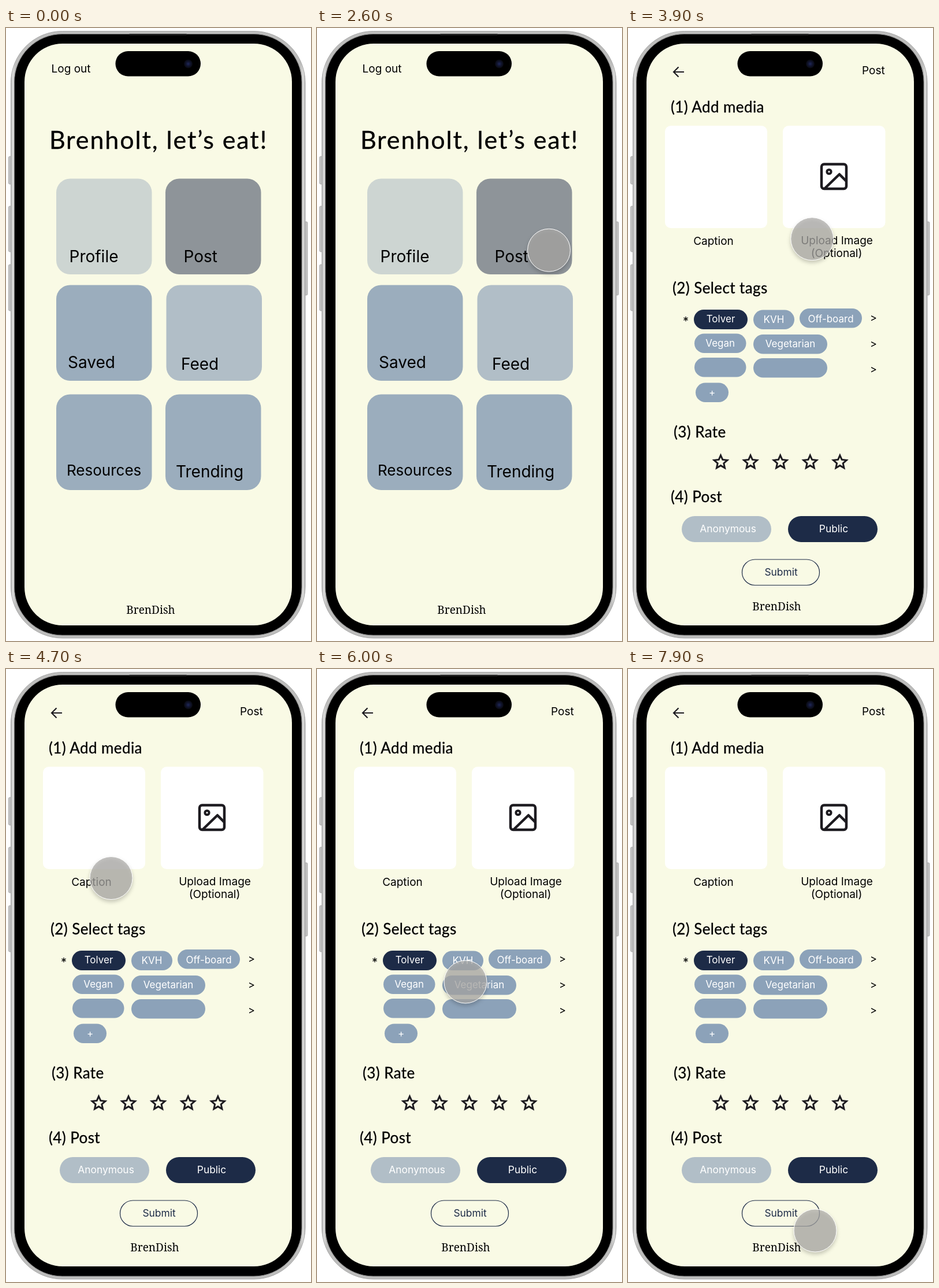
Write an HTML page that moves like this. It is 528 px wide and 1060 px high and loops after 8 s.

```html
<!DOCTYPE html>
<html lang="en">
<head>
<meta charset="utf-8">
<title>Campus food app</title>
<style>
  html, body { margin: 0; width: 100%; height: 100%; overflow: hidden; background: #fff; }
  svg { display: block; width: 528px; height: 1060px; }
  text { font-family: Inter, sans-serif; white-space: pre; }
  .hand { font-family: Lato, sans-serif; stroke: #000; stroke-width: .3; stroke-linejoin: round; letter-spacing: .4px; }
  .title { letter-spacing: 1.9px; }
  .brand { font-family: "Noto Serif", serif; }
  .line { fill: none; stroke: #1d1b20; }
  #touch { stroke: #fff; stroke-width: 1; fill: rgba(173, 172, 170, .72); filter: drop-shadow(0 4px 3px rgba(0, 0, 0, .25)); }
  #touch.pressed { fill: rgba(121, 121, 121, .66); filter: none; }
</style>
</head>
<body>
<svg viewBox="0 0 528 1060">
  <defs>
    <linearGradient id="metal">
      <stop offset="0" stop-color="#a9a9aa"/>
      <stop offset=".006" stop-color="#dededd"/>
      <stop offset=".016" stop-color="#bdbdbc"/>
      <stop offset=".984" stop-color="#bdbdbc"/>
      <stop offset=".994" stop-color="#dededd"/>
      <stop offset="1" stop-color="#a9a9aa"/>
    </linearGradient>
    <radialGradient id="lens">
      <stop offset="0" stop-color="#20285a"/>
      <stop offset=".5" stop-color="#11152f"/>
      <stop offset="1" stop-color="#08090f"/>
    </radialGradient>
  </defs>
  <g id="phone"></g>
  <g id="home"></g>
  <g id="post"></g>
  <g id="island"></g>
  <circle id="touch" r="37"/>
</svg>
<script>
const $ = id => document.getElementById(id);
const NAVY = '#1d2b47', BLUE = '#8ca2b9', PALE = '#b1bec7', STEEL = '#9badbd';

const box = (x, y, w, h, r, fill, extra = '') =>
  `<rect x="${x}" y="${y}" width="${w}" height="${h}" rx="${r}" fill="${fill}" ${extra}/>`;
const text = (s, x, y, size, { fill = '#000', mid = false, cls = '' } = {}) =>
  `<text x="${x}" y="${y}" font-size="${size}" fill="${fill}" class="${cls}"
    text-anchor="${mid ? 'middle' : 'start'}">${s}</text>`;
const centred = (s, x, y, size, fill) => text(s, x, y, size, { fill, mid: true });
const heading = (s, x, y) => text(s, x, y, 26, { cls: 'hand' });
const brand = (x, y) => text('BrenDish', x, y, 19, { mid: true, cls: 'brand' });
const pill = (x, y, w, h, fill, label = '', dy = 22, size = 17, cx = x + w / 2) =>
  box(x, y, w, h, h / 2, fill) + centred(label, cx, y + dy, size, '#fff');
const button = (x, y, h) => box(x, y, 6, h, 2, '#c2c2c2', 'stroke="#999" stroke-width=".7"');

const tile = (x, y, fill, label, tx, ty, size = 28) =>
  box(x, y, 165.5, 165.5, 24, fill) + text(label, tx, ty, size);

function star(cx, cy) {
  const points = Array.from({ length: 10 }, (_, i) => {
    const r = i % 2 ? 5.6 : 12, a = (i / 5 - .5) * Math.PI;
    return [cx + r * Math.cos(a), cy + r * Math.sin(a)].map(v => v.toFixed(2));
  });
  return `<polygon class="line" stroke-width="3" stroke-miterlimit="9" points="${points.join(' ')}"/>`;
}

$('phone').innerHTML =
  button(4.5, 222, 48) + button(4.5, 308, 79) + button(4.5, 409, 80) + button(516, 335, 127) +
  box(8.5, 5.5, 509.5, 1049.5, 89, 'url(#metal)', 'stroke="#a6a6a6"') +
  box(14.5, 10.5, 497.5, 1039.5, 83, '#000', 'stroke="#777"') +
  box(213, 10, 100, 2.5, 1.2, '#252525') +
  box(32, 27, 463, 1006, 66, '#f9fae5');

$('island').innerHTML = box(189.5, 40, 147.5, 43.5, 21.75, '#000') +
  '<circle cx="315.5" cy="62" r="7.5" fill="url(#lens)"/>';

$('home').innerHTML =
  text('Log out', 78.5, 77, 19) +
  text('Brenholt, let’s eat!', 264, 209, 43, { mid: true, cls: 'hand title' }) +
  tile(87, 260.5, '#cdd5d2', 'Profile', 109.5, 404.5) +
  tile(276, 260.5, '#8e9499', 'Post', 307.5, 404.5) +
  tile(87, 444.5, STEEL, 'Saved', 107, 588) +
  tile(277.5, 444.5, PALE, 'Feed', 303, 590.5) +
  tile(87, 633.5, STEEL, 'Resources', 105, 774, 26) +
  tile(276, 633.5, STEEL, 'Trending', 294, 777) +
  brand(250.5, 1013);

$('post').innerHTML =
  '<path class="line" stroke-width="2.2" d="M97 76H79.5M87.5 67.5L79 76l8.5 8.5"/>' +
  text('Post', 405, 80, 19) +
  heading('(1) Add media', 74, 146) +
  box(64, 169, 177, 177, 10, '#fff') +
  box(268, 169, 177.5, 177, 10, '#fff') +
  `<g class="line" stroke-width="4.5" stroke-linejoin="round">
    <rect x="335" y="235.5" width="43" height="42.5" rx="4.5"/>
    <circle cx="348" cy="248.5" r="3.6" stroke-width="4"/>
    <path d="M340 278L366 253l12 12"/>
  </g>` +
  centred('Caption', 148, 375, 19) +
  centred('Upload Image', 361.5, 374, 19) +
  centred('(Optional)', 361, 396, 19) +
  heading('(2) Select tags', 77, 459) +
  centred('*', 100, 514, 20) +
  pill(114, 487, 93, 34, NAVY, 'Tolver') +
  pill(217, 487.5, 71, 33.5, BLUE, 'KVH') +
  pill(297, 485, 108, 33.5, BLUE, 'Off-board', 24) +
  pill(115, 528.5, 89.5, 33.5, BLUE, 'Vegan') +
  pill(217, 530, 128, 33.5, BLUE, 'Vegetarian') +
  pill(115, 570, 89.5, 33.5, BLUE) +
  pill(217, 571, 128, 33.5, BLUE) +
  pill(117, 613.5, 57, 33.5, BLUE, '+') +
  [507, 552, 596].map(y => centred('&gt;', 425, y, 18)).join('') +
  heading('(3) Rate', 79, 708) +
  [0, 1, 2, 3, 4].map(i => star(160.5 + i * 51.6, 751)).join('') +
  heading('(4) Post', 74, 820) +
  pill(93, 844, 155, 45, PALE, 'Anonymous', 27.5, 17.4, 173) +
  pill(277, 844, 155, 45, NAVY, 'Public', 27.5, 17.4, 356) +
  box(197.5, 919, 134, 44.5, 22.25, 'none', `stroke="${NAVY}" stroke-width="1.2"`) +
  centred('Submit', 265, 947, 17.4, NAVY) +
  brand(257.5, 1007);

// Touch path: [ms, x, y]
const path = [
  [2050, 570, 590], [2450, 440, 415], [2900, 357, 365], [3650, 357, 365],
  [4100, 270, 364], [4500, 182, 361.5], [4750, 182, 361.5],
  [5100, 172, 430], [5450, 195, 505], [6000, 257, 541], [6300, 257, 541],
  [6500, 253, 575], [6650, 253, 575], [6850, 190, 715], [7100, 354, 763],
  [7300, 410, 850], [7550, 372, 962], [7850, 324, 971], [8000, 324, 971]
];

const same = (a, b) => a[1] === b[1] && a[2] === b[2];

// Velocity at a waypoint; zero next to a rest.
function slope(i, k) {
  const a = path[i - 1], p = path[i], b = path[i + 1];
  if (!a || !b || same(a, p) || same(p, b)) return 0;
  return (b[k] - a[k]) / (b[0] - a[0]);
}

function position(t) {
  const i = path.findIndex(p => p[0] > t) - 1;
  const a = path[i], b = path[i + 1], d = b[0] - a[0], u = (t - a[0]) / d;
  const ease = u * u * (3 - 2 * u);
  return [1, 2].map(k => a[k] + (b[k] - a[k]) * ease +
    d * (u * (1 - u) ** 2 * slope(i, k) - u * u * (1 - u) * slope(i + 1, k)));
}

function draw() {
  const t = performance.now() % 8000, touch = $('touch');
  const posting = t >= 3200, touching = t >= path[0][0];
  $('home').style.display = posting ? 'none' : '';
  $('post').style.display = posting ? '' : 'none';
  touch.style.display = touching ? '' : 'none';
  if (touching) {
    touch.setAttribute('transform', `translate(${position(t)})`);
    touch.classList.toggle('pressed', t >= 3000 && t < 3300);
  }
  requestAnimationFrame(draw);
}
draw();
</script>
</body>
</html>
```
